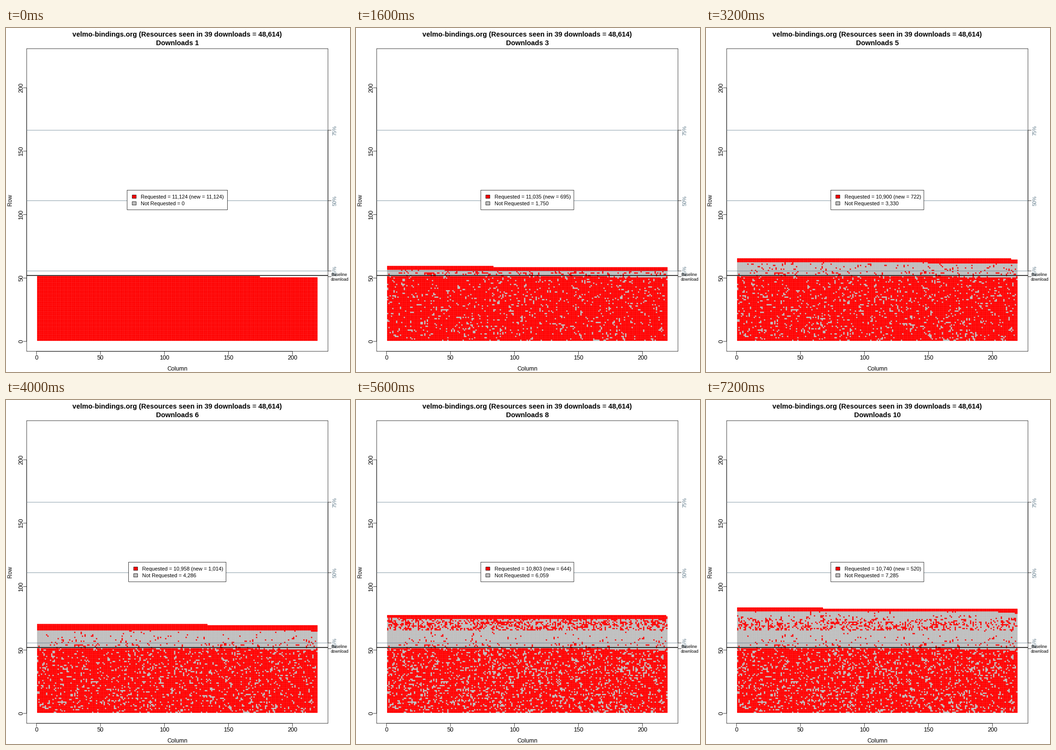
Recreate the animation shown at these times as a matplotlib script. Size 720x720 px, loop 8 s.

```python
import numpy as np
import matplotlib.pyplot as plt
from matplotlib.animation import FuncAnimation
from matplotlib.patches import Rectangle

plt.rcParams["font.family"] = "Liberation Sans"

SIZE = 720
COLS, ROWS = 219, 222
LEFT, RIGHT, TOP, BOTTOM = 43.2, 673.92, 43.2, 676.8
SX = (RIGHT - LEFT) / ((COLS - 1) * 1.08)
SY = (BOTTOM - TOP) / ((ROWS - 1) * 1.08)
MID_X = (LEFT + RIGHT) / 2
MID_Y = (TOP + BOTTOM) / 2
RED, GREY, SLATE = "#ff0000", "#bebebe", "#607b8b"
THIN = 0.75
DOT = 3.35

# Resources first seen in each download, and seen earlier but not requested.
NEW = np.array([11124, 966, 695, 723, 722, 1014, 974, 644, 643, 520])
MISSED = np.array([0, 962, 1750, 2480, 3330, 4286, 5458, 6059, 6690, 7285])
# Long-term share of each batch that is still requested.
KEPT = np.array([1, 0.09, 0.045, 0.03, 0.012, 0.25, 0.22, 0.06, 0.012, 1])
SEEN = np.cumsum(NEW)
TOTAL = SEEN[-1]


def px(col):
    return LEFT + (0.04 * (COLS - 1) + col - 1) * SX


def py(row):
    return BOTTOM - (0.04 * (ROWS - 1) + row - 1) * SY


index = np.arange(TOTAL)
cell_row = index // COLS + 1
cells = np.column_stack([px(index % COLS + 1), py(cell_row)])
batch = np.searchsorted(SEEN, index, side="right")

# Neighbouring cells share some noise, which gives small clumps.
noise = np.random.default_rng(39).random(TOTAL)
clumped = noise + 0.2 * np.roll(noise, 1) + 0.2 * np.roll(noise, COLS)
luck = np.argsort(np.argsort(clumped)) / TOTAL
row_bias = np.where(batch == 1, np.where(cell_row == 54, 2.0, 0.75), 1.0)


def missed_cells(step):
    """Mask of the cells that are not requested in this download."""
    jitter = np.random.default_rng(100 + step).random(TOTAL)
    score = luck + 0.06 * (jitter - 0.5)
    age = np.maximum(step - batch, 1)
    kept = KEPT[batch] * (1 + 1 / age) * row_bias
    grey = (batch > 0) & (batch < step) & (score < 1 - kept)
    rest = max(MISSED[step] - grey.sum(), 0)
    grey[np.argsort(score[:NEW[0]])[:rest]] = True
    return grey


fig = plt.figure(figsize=(SIZE / 72, SIZE / 72), dpi=72, facecolor="white")
ax = fig.add_axes([0, 0, 1, 1])
ax.set_xlim(0, SIZE)
ax.set_ylim(SIZE, 0)
ax.axis("off")


def line(x0, y0, x1, y1, color="black", width=THIN, z=3):
    ax.plot([x0, x1], [y0, y1], color=color, lw=width, zorder=z,
            snap=False, solid_capstyle="butt")


def label(x, y, text, size, ha="center", turn=0, **style):
    return ax.text(x, y, text, fontsize=size, ha=ha, va="baseline",
                   rotation=turn, rotation_mode="anchor", zorder=6, **style)


def box(x, y, w, h, fill, z):
    patch = Rectangle((x, y), w, h, fc=fill, ec="black", lw=THIN,
                      zorder=z, snap=False)
    return ax.add_patch(patch)


dots = ax.scatter([], [], s=DOT ** 2, linewidths=0, zorder=2)

# Frame and axes
box(LEFT, TOP, RIGHT - LEFT, BOTTOM - TOP, "none", 3)
line(px(0), BOTTOM, px(200), BOTTOM)
line(LEFT, py(0), LEFT, py(200))
for value in range(0, 201, 50):
    line(px(value), BOTTOM, px(value), BOTTOM + 7.2)
    line(LEFT, py(value), LEFT - 7.2, py(value))
    label(px(value), 694.3, str(value), 12.4)
    label(35.2, py(value), str(value), 12.4, turn=90)
label(MID_X, 717.2, "Column", 12.3)
label(12.2, MID_Y, "Row", 12.3, turn=90)

# Percentage guides
line(RIGHT, py(ROWS * 0.25), RIGHT, py(ROWS * 0.75))
for percent in (25, 50, 75):
    y = py(ROWS * percent / 100)
    line(LEFT, y, RIGHT, y, SLATE)
    line(RIGHT, y, RIGHT + 7.2, y)
    label(691.2, y, f"{percent}%", 10.8, turn=90, color=SLATE)

# Baseline marker
line(LEFT, py(52), RIGHT, py(52), width=1.5, z=4)
line(RIGHT, py(51), RIGHT + 7.2, py(51))
label(680, 519.3, "Baseline", 8.7, "left")
label(680, 529.3, "download", 8.7, "left")

# Titles
label(MID_X, 18.2,
      "velmo-bindings.org (Resources seen in 39 downloads = 48,614)",
      14.5, weight="bold")
title = label(MID_X, 36, "", 14.5, weight="bold")

# Legend
panel = box(0, 339.4, 210, 41, "white", 5)
swatches = [box(0, y, 8.4, 7, c, 6) for y, c in ((349.6, RED), (363.6, GREY))]
entries = [label(0, y, "", 11, "left") for y in (357.1, 371.1)]
PALETTE = np.array([[1, 0, 0, 1], [190 / 255] * 3 + [1]])


def update(step):
    seen = SEEN[step]
    grey = missed_cells(step)[:seen]
    dots.set_offsets(cells[:seen])
    dots.set_facecolors(PALETTE[grey.astype(int)])

    title.set_text(f"Downloads {step + 1}")
    fresh = f"{NEW[step]:,}"
    entries[0].set_text(
        f"Requested = {seen - MISSED[step]:,} (new = {fresh})")
    entries[1].set_text(f"Not Requested = {MISSED[step]:,}")

    commas = fresh.count(",")
    digits = len(fresh) - commas
    width = 34 + 11 * (12.952 + 0.556 * digits + 0.278 * commas)
    left = MID_X - width / 2
    panel.set_x(left)
    panel.set_width(width)
    for swatch in swatches:
        swatch.set_x(left + 10.6)
    for entry in entries:
        entry.set_x(left + 28.7)
    return [dots, title, panel, *swatches, *entries]


anim = FuncAnimation(fig, update, frames=len(NEW), interval=800,
                     init_func=lambda: update(0), repeat=True,
                     repeat_delay=0, blit=False)
plt.show()
```
